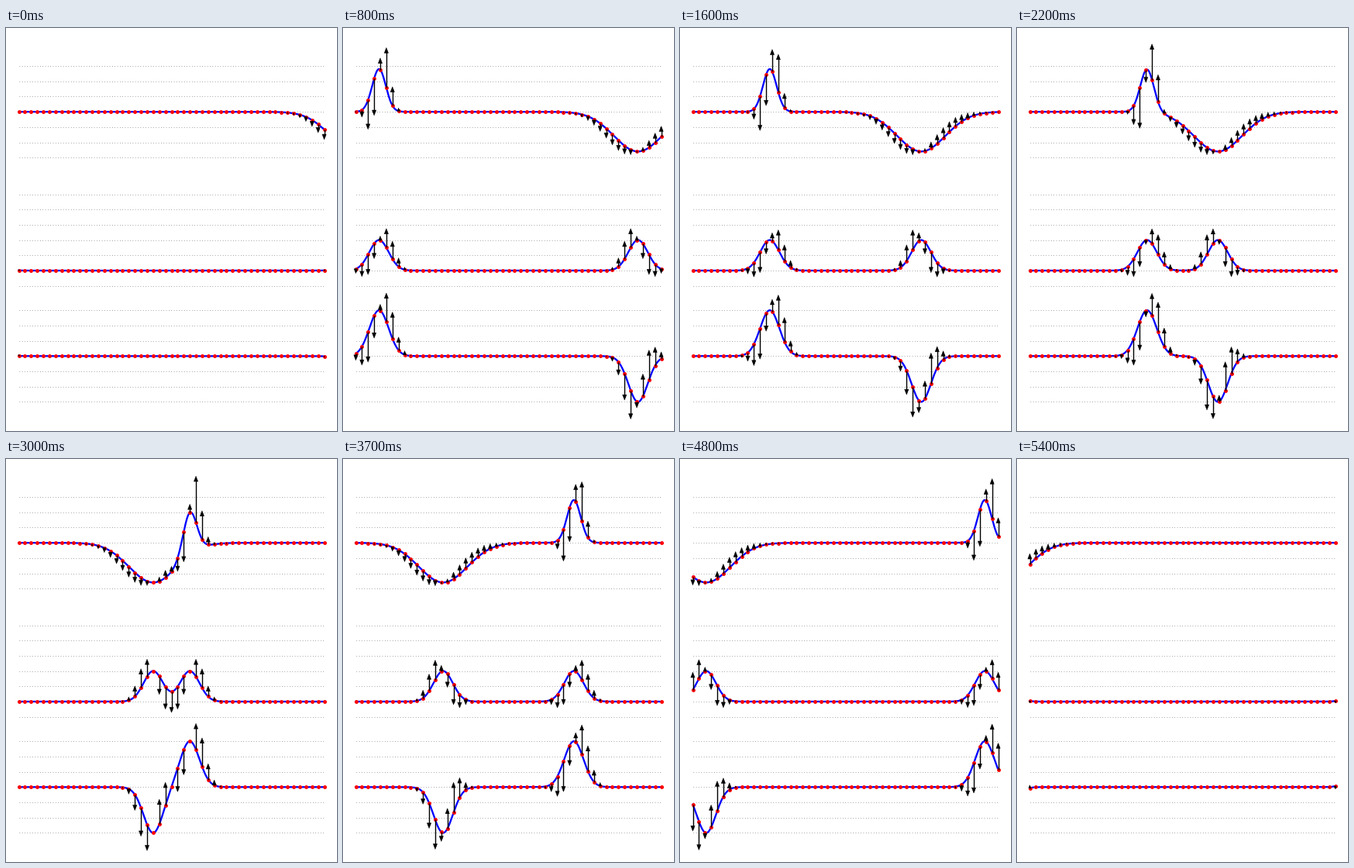
Write a matplotlib script that moves like this. It is 427 by 520 pixels and loops after 5.5 s.

```python
import numpy as np
import matplotlib.pyplot as plt
from matplotlib.animation import FuncAnimation
from matplotlib.collections import LineCollection, PolyCollection

W, H, DPI = 427, 520, 64  # a power of two keeps the pixel size exact
FRAMES, INTERVAL = 55, 100
PT = 72 / DPI            # one pixel in points
UNIT = 39.4              # pixels per unit, both axes
START, STEP = 6.0, 0.22  # pulse start distance and travel per frame
ARROW = 0.347            # arrow length per unit of velocity
HEAD_LEN, HEAD_HALF = 6.8, 2.6

# baseline y, grid range, right-moving and left-moving pulse (height, sharpness)
PANELS = [
    (108.1, (-1.5, 1.5), (1.4, 10), (-1.3, 0.8)),
    (313.0, (-0.5, 2.5), (1.0, 5), (1.0, 5)),
    (423.3, (-1.5, 1.5), (1.5, 5), (-1.5, 5)),
]

curve_x = np.linspace(-5, 5, 501)
bead_x = np.linspace(-5, 5, 51)


def px(x):
    return W / 2 + UNIT * x


def pulse(x, centre, height, sharp):
    """Height and slope of a Gaussian pulse."""
    d = x - centre
    y = height * np.exp(-sharp * d * d)
    return y, -2 * sharp * d * y


def wave(x, frame, right, left):
    """Displacement and vertical velocity of two crossing pulses."""
    centre = -START + STEP * frame
    y1, s1 = pulse(x, centre, *right)
    y2, s2 = pulse(x, -centre, *left)
    return y1 + y2, s2 - s1


def arrow_shapes(x, y, length):
    """Shafts and heads of vertical arrows; short arrows get smaller heads."""
    shafts, heads = [], []
    for xi, yi, li in zip(x, y, length):
        if abs(li) < 0.3:
            continue
        tip = yi - li
        head = min(HEAD_LEN, abs(li))
        half = HEAD_HALF * head / HEAD_LEN
        base = tip + np.sign(li) * head
        shafts.append([(xi, yi), (xi, (base + tip) / 2)])
        heads.append([(xi, tip), (xi - half, base), (xi + half, base)])
    return shafts, heads


fig = plt.figure(figsize=(W / DPI, H / DPI), dpi=DPI, facecolor="white")
ax = fig.add_axes([0, 0, 1, 1])
ax.set_xlim(0, W)
ax.set_ylim(H, 0)
ax.axis("off")

curves, beads = [], []
for base, (low, high), _, _ in PANELS:
    for level in np.arange(low, high + 0.1, 0.5):
        y = base - UNIT * level
        ax.plot(px(np.array([-5, 5])), [y, y], color="0.35", lw=0.8 * PT,
                ls=(0, (0.8, 3.35)), dash_capstyle="butt", zorder=1)
    curves += ax.plot([], [], color="blue", lw=2.3 * PT, zorder=2)
    beads += ax.plot([], [], "o", color="red", ms=4.9 * PT, mew=0, zorder=3)

shaft_art = LineCollection([], colors="black", linewidths=1.4 * PT,
                           capstyle="butt", zorder=4)
head_art = PolyCollection([], facecolors="black", edgecolors="black",
                          linewidths=0.5 * PT, zorder=5)
ax.add_collection(shaft_art, autolim=False)
ax.add_collection(head_art, autolim=False)


def update(frame):
    shafts, heads = [], []
    for (base, _, right, left), curve, bead in zip(PANELS, curves, beads):
        y, _ = wave(curve_x, frame, right, left)
        curve.set_data(px(curve_x), base - UNIT * y)
        y, v = wave(bead_x, frame, right, left)
        bead_y = base - UNIT * y
        bead.set_data(px(bead_x), bead_y)
        s, h = arrow_shapes(px(bead_x), bead_y, ARROW * UNIT * v)
        shafts += s
        heads += h
    shaft_art.set_segments(shafts)
    head_art.set_verts(heads)
    return [*curves, *beads, shaft_art, head_art]


anim = FuncAnimation(fig, update, frames=FRAMES, interval=INTERVAL,
                     repeat=True, repeat_delay=0, blit=False)
plt.show()
```
